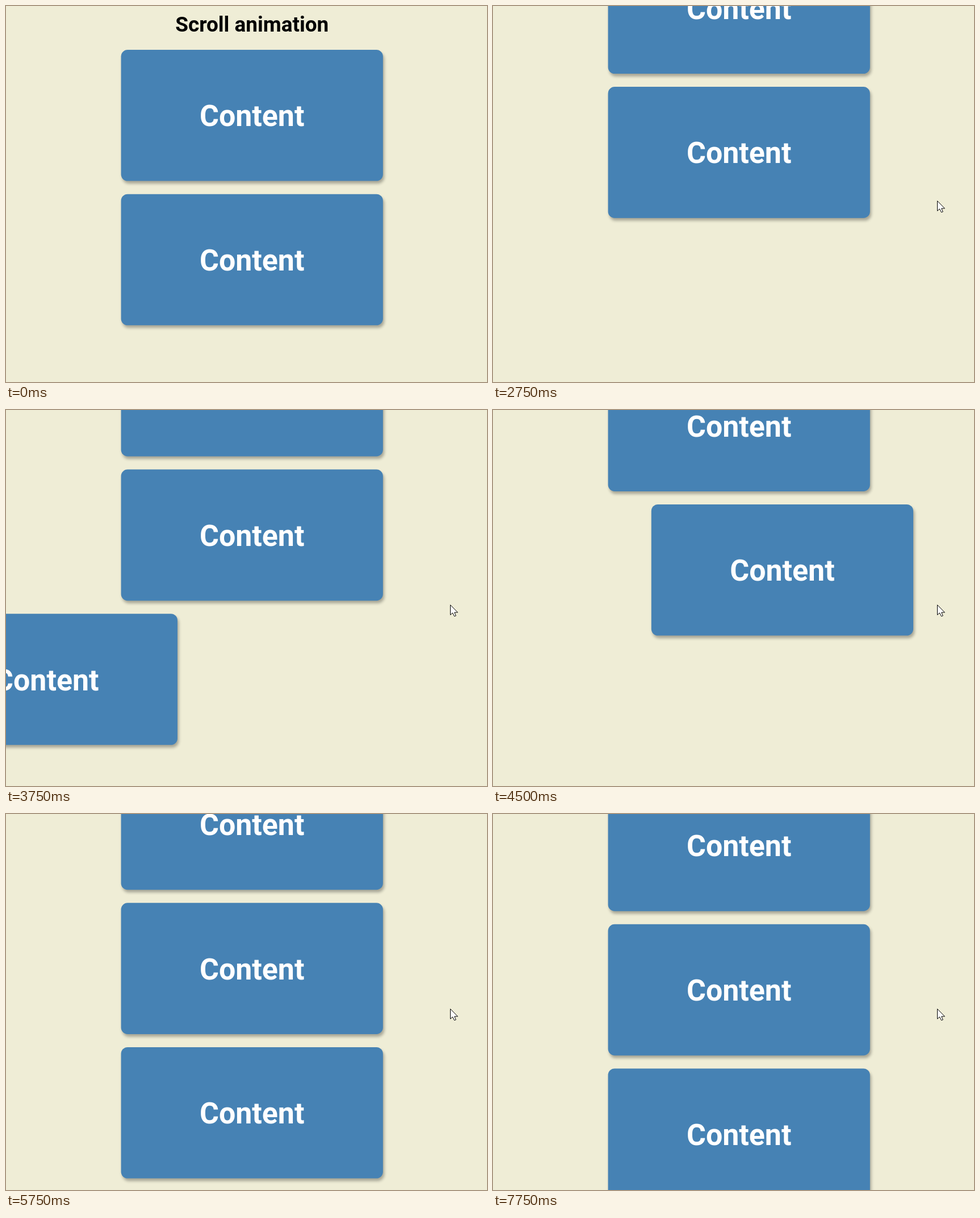
An HTML page with a canvas for the animation above (8000 ms loop, 847x661 px).

```html
<!DOCTYPE html>
<html lang="en">
<head>
<meta charset="utf-8">
<title>Scroll animation</title>
<style>
  html, body { margin: 0; width: 100%; height: 100%; overflow: hidden; background: #efedd6; }
  canvas { display: block; width: 847px; height: 661px; }
</style>
</head>
<body>
<canvas id="stage"></canvas>
<script>
const W = 847, H = 661, LOOP = 8000;
const REFRESH = 250;                // the picture is renewed four times a second
const UNIT = 1.153;                 // page zoom
const CENTER = 433.2;
const BOX = { w: 400 * UNIT, h: 200 * UNIT, top: 77, pitch: 220 * UNIT, r: 10 * UNIT };
const TRIGGER = H * 0.8;            // a box slides in once its top is above this line
const SLIDE = 345;                  // slide duration
const BOXES = 10;

// wheel turns: [time, scroll offset reached]
const TURNS = [
  [0, 0], [1900, 288.5], [2200, 300], [2690, 442.2], [2990, 640],
  [3577, 987.1], [4243, 1298], [4390, 1433], [5006, 1828.7], [5300, 1950],
  [6450, 1620], [6700, 1433], [7485, 1316], [7700, 1151.5]
];

const canvas = document.getElementById('stage');
const ctx = canvas.getContext('2d');
const dpr = window.devicePixelRatio || 1;
canvas.width = W * dpr;
canvas.height = H * dpr;

const boxTop = (index, scroll) => BOX.top + index * BOX.pitch - scroll;

// the CSS "ease" curve, cubic-bezier(.25, .1, .25, 1)
function ease(x) {
  if (x >= 1) return 1;
  const bezier = (u, a, b) => 3 * u * (1 - u) ** 2 * a + 3 * u * u * (1 - u) * b + u ** 3;
  let low = 0, high = 1;
  for (let i = 0; i < 20; i++) {
    const mid = (low + high) / 2;
    if (bezier(mid, 0.25, 0.25) < x) low = mid; else high = mid;
  }
  return bezier(low, 0.1, 1);
}

// sideways offset: even boxes wait on the right, odd ones on the left
function slideOffset(index, turns, t) {
  let shown = false, since = -SLIDE;
  for (const [time, scroll] of turns) {
    const show = boxTop(index, scroll) < TRIGGER;
    if (show !== shown) {
      shown = show;
      since = time || -SLIDE;
    }
  }
  const p = ease((t - since) / SLIDE);
  return (index % 2 ? -4 : 4) * BOX.w * (shown ? 1 - p : p);
}

function label(text, x, y, size, color) {
  ctx.font = `bold ${size}px Roboto, sans-serif`;
  ctx.textAlign = 'center';
  ctx.fillStyle = color;
  ctx.fillText(text, x, y);
}

function drawBox(y, dx) {
  ctx.save();
  ctx.shadowColor = 'rgba(0, 0, 0, 0.3)';
  ctx.shadowBlur = 5 * UNIT * dpr;
  ctx.shadowOffsetX = 2 * UNIT * dpr;
  ctx.shadowOffsetY = 4 * UNIT * dpr;
  ctx.fillStyle = 'steelblue';
  ctx.beginPath();
  ctx.roundRect(CENTER - BOX.w / 2 + dx, y, BOX.w, BOX.h, BOX.r);
  ctx.fill();
  ctx.restore();
  label('Content', CENTER + dx, y + 134.3, 45 * UNIT, '#fff');
}

function drawCursor(x, y) {
  ctx.save();
  ctx.translate(x, y);
  ctx.beginPath();
  ctx.moveTo(0, 0);
  [[0, 17.5], [4, 14], [7, 20], [9.8, 19], [7.2, 13.2], [13, 13.2]]
    .forEach(([px, py]) => ctx.lineTo(px, py));
  ctx.closePath();
  ctx.fillStyle = '#fff';
  ctx.strokeStyle = '#000';
  ctx.fill();
  ctx.stroke();
  ctx.restore();
}

function draw(t) {
  const turns = TURNS.filter(([time]) => time <= t);
  const scroll = turns[turns.length - 1][1];
  ctx.setTransform(dpr, 0, 0, dpr, 0, 0);
  ctx.fillStyle = '#efedd6';
  ctx.fillRect(0, 0, W, H);
  label('Scroll animation', CENTER, 45 - scroll, 32 * UNIT, '#000');
  for (let i = 0; i < BOXES; i++) drawBox(boxTop(i, scroll), slideOffset(i, turns, t));
  if (t >= 1500) drawCursor(t < 1750 ? 786 : 782.5, 342.7);
}

const start = performance.now();
function tick() {
  const t = (performance.now() - start) % LOOP;
  draw(Math.floor(t / REFRESH) * REFRESH);
  requestAnimationFrame(tick);
}
tick();
</script>
</body>
</html>
```
